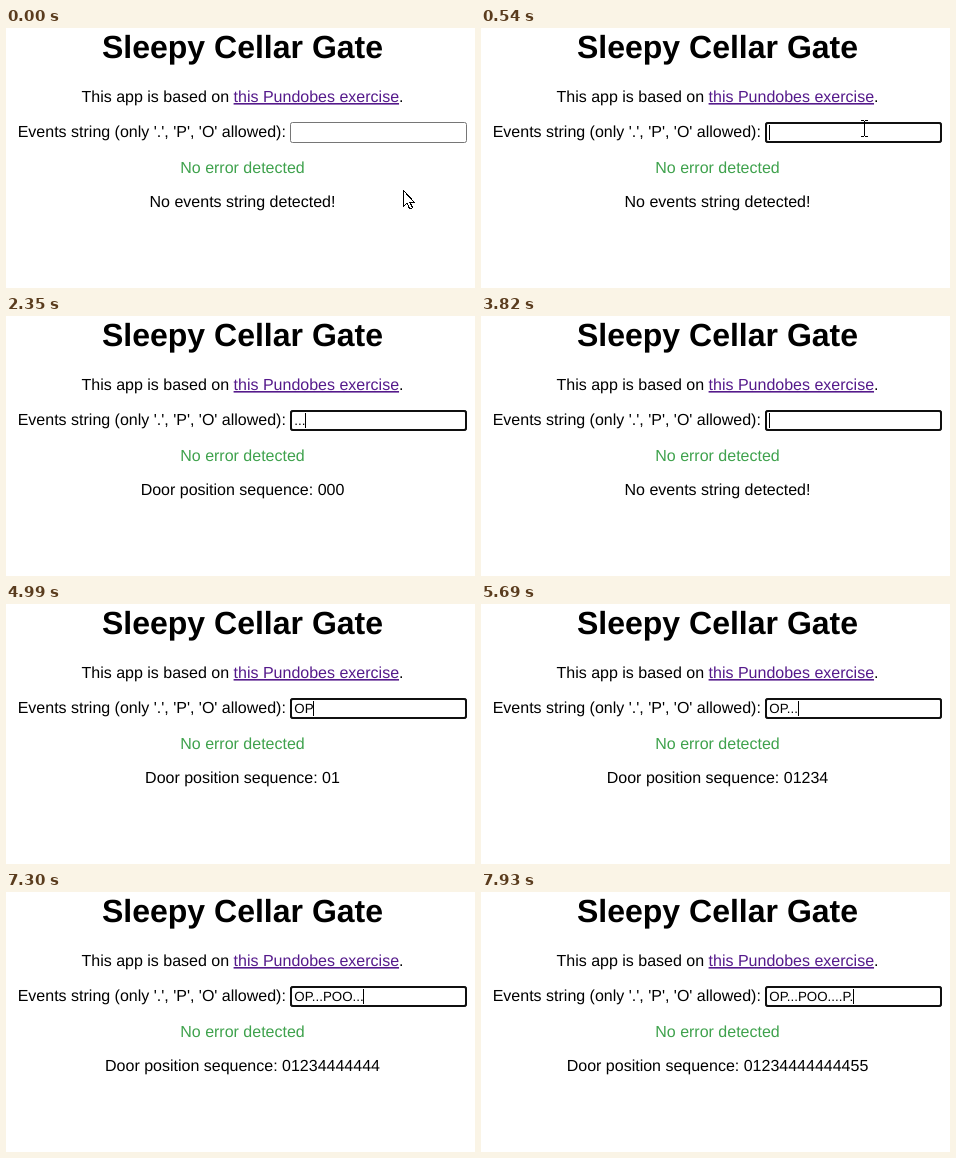
These frames come from a looping animation (469 px wide and 260 px high, 8 s). An HTML page:

```html
<!DOCTYPE html>
<html lang="en">
<head>
<meta charset="utf-8">
<title>Sleepy Cellar Gate</title>
<style>
  html, body { margin: 0; width: 100%; height: 100%; overflow: hidden; background: #fff; }
  svg { display: block; width: 469px; height: 260px; }
  text { font: 16px "Liberation Sans", Arial, sans-serif; text-rendering: geometricPrecision; }
  .mid { text-anchor: middle; }
  .title { font-size: 32px; font-weight: bold; }
  .link { fill: #551a8b; text-decoration: underline 1px; }
  #value { font-size: 13.333px; }
</style>
</head>
<body>
<svg viewBox="0 0 469 260">
  <rect width="469" height="260" fill="#fff"/>
  <text class="mid title" x="236.5" y="30">Sleepy Cellar Gate</text>
  <text class="mid" x="236.5" y="74">This app is based on <tspan class="link">this Pundobes exercise</tspan>.</text>
  <text x="279.9" y="109" text-anchor="end">Events string (only '.', 'P', 'O' allowed):</text>
  <rect id="border" x="284.5" y="94.5" width="176" height="20" rx="2" fill="#fff"/>
  <rect id="ring" x="285" y="95" width="175" height="19" rx="2" fill="#fff" stroke="#101010" stroke-width="2"/>
  <rect id="mark" x="288" y="97" width="0" height="15" fill="#0078d7"/>
  <text id="value" x="288.3" y="109"></text>
  <rect id="caret" y="97" width="1" height="15"/>
  <text class="mid" x="236.5" y="145" fill="#3fa24d">No error detected</text>
  <text id="status" class="mid" x="236.5" y="179"></text>
  <path id="arrow" d="M.5 .5V16.5L4 13L6.5 18.5H8.5L9.5 17.5L7 12.5H11.5Z" fill="#fff" stroke="#000" shape-rendering="crispEdges"/>
  <path id="beam" d="M0 .5h3m1 0h3M3.5 1v15M0 16.5h3m1 0h3" fill="none" stroke="#000"/>
</svg>
<script>
const LOOP = 8000, HOVER = 150, FOCUS = 470, BLINK = 530;
const SELECT = 3270, CLEAR = 3820, LEFT = 288;

// start time, shape, x, y
const pointer = [
  [0, 'arrow', 397, 162], [70, 'arrow', 391, 132],
  [150, 'beam', 381, 104], [320, 'beam', 380, 97],
  [470, 'beam', 380, 92], [550, 'beam', 386, 96],
  [620, 'arrow', 405, 124], [700, 'arrow', 432, 160],
  [770, 'arrow', 459, 191], [850, '']
];

const rounds = [
  { start: FOCUS, text: '.....', keys: [2030, 2200, 2350, 2520, 2750] },
  { start: CLEAR, text: 'OP...POO....P.',
    keys: [4760, 4990, 5360, 5590, 5690, 5990, 6220, 6620, 7020, 7150, 7300, 7380, 7610, 7930] }
];

const el = {};
document.querySelectorAll('[id]').forEach(e => el[e.id] = e);
const show = (e, on) => e.setAttribute('visibility', on ? 'visible' : 'hidden');
const write = (e, s) => { if (e.textContent !== s) e.textContent = s; };

function positions(events) {
  let pos = 0, dir = 1, moving = false;
  return [...events].map(c => {
    if (c === 'P') moving = !moving;
    if (c === 'O' && moving) dir = -dir;
    if (moving) pos += dir;
    if (moving && (pos <= 0 || pos >= 5)) {
      moving = false;
      dir = pos > 0 ? -1 : 1;
    }
    return pos;
  }).join('');
}

function drawPointer(t) {
  const [, shape, x, y] = pointer.filter(p => p[0] <= t).pop();
  for (const name of ['arrow', 'beam']) show(el[name], name === shape);
  if (shape) el[shape].setAttribute('transform', `translate(${x} ${y})`);
}

function drawField(t) {
  const round = rounds[t < CLEAR ? 0 : 1];
  const typed = round.keys.filter(k => k <= t);
  const text = round.text.slice(0, typed.length);
  const lastKey = typed.length ? typed[typed.length - 1] : round.start;
  const focused = t >= FOCUS;
  const selected = t >= SELECT && t < CLEAR;

  write(el.value, text);
  write(el.status, text ? 'Door position sequence: ' + positions(text) : 'No events string detected!');
  const width = text ? Math.round(el.value.getComputedTextLength()) : 0;

  el.border.setAttribute('stroke', t < HOVER ? '#767676' : '#4f4f4f');
  show(el.ring, focused);
  el.mark.setAttribute('width', selected ? width : 0);
  el.value.setAttribute('fill', selected ? '#fff' : '#000');
  el.caret.setAttribute('x', LEFT + width);
  show(el.caret, focused && !selected && Math.floor((t - lastKey) / BLINK) % 2 === 0);
}

function draw(t) {
  drawPointer(t);
  drawField(t);
}

const begin = performance.now();
function tick() {
  draw((performance.now() - begin) % LOOP);
  requestAnimationFrame(tick);
}
draw(0);
requestAnimationFrame(tick);
</script>
</body>
</html>
```
